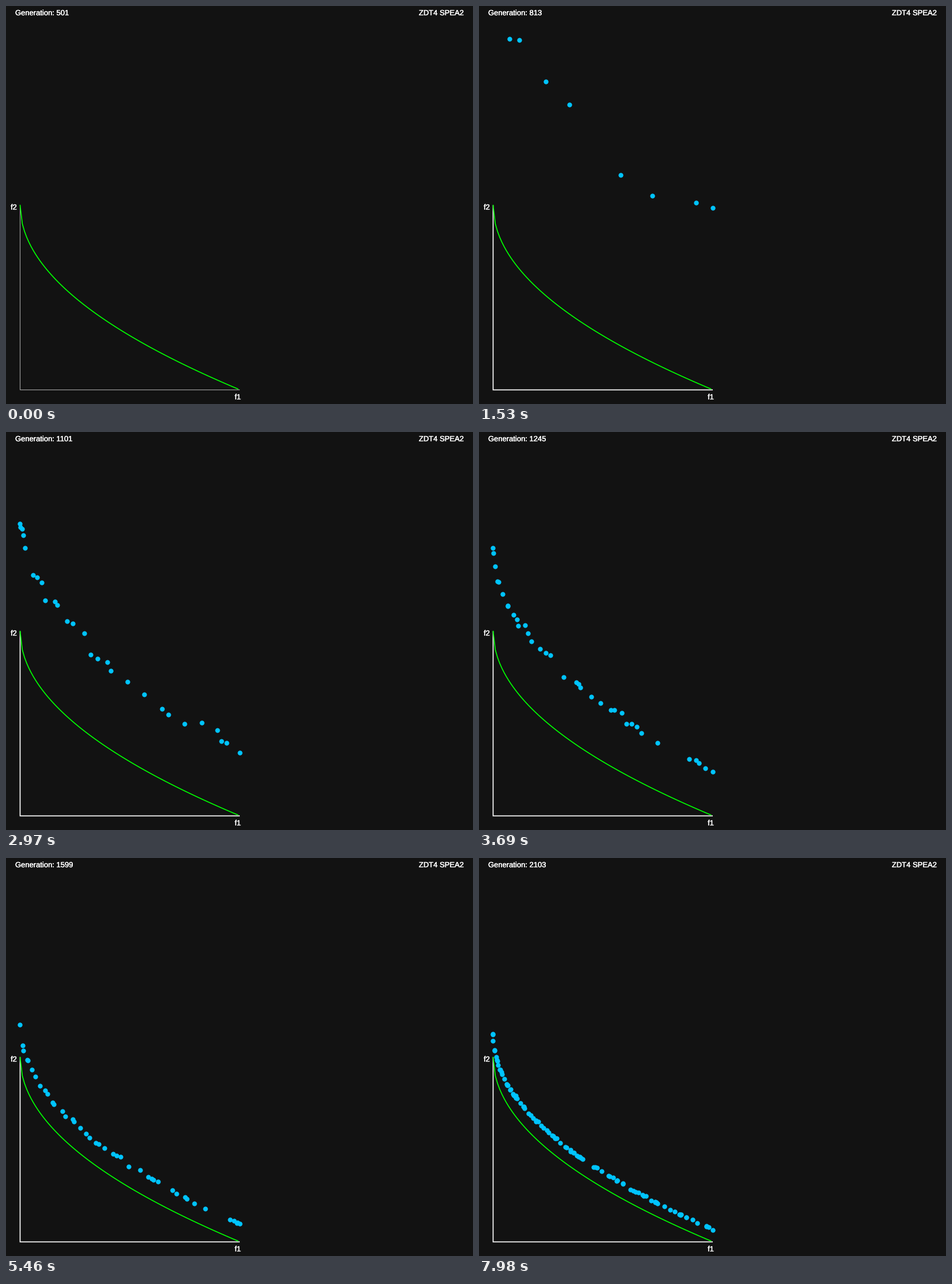
Write a matplotlib script that moves like this. It is 811 px wide and 690 px high and loops after 8000 ms.

```python
import numpy as np
import matplotlib.pyplot as plt
from matplotlib.animation import FuncAnimation
from matplotlib.patheffects import withStroke

W, H, DPI = 811, 690, 64
PT = 72 / DPI                      # points per pixel
LOOP, TICK, STEP = 8000, 20, 30    # ms
X0, Y0, SX, SY = 24, 665, 382, 320
BG, DOT, CURVE = "#121212", "#00c4ff", "#00ff00"

# How the search goes: front level, spread above it and number of candidates
STEPS = [0, 51, 99, 149, 182, 220, 266]
LEVEL = [4.25, 2.28, 1.57, 1.265, 1.165, 1.153, 1.118]
SPREAD = [0.3, 0.25, 0.1, 0.025, 0.02, 0.012, 0.015]
COUNT = [10, 14, 40, 50, 44, 110, 95]
SLOTS, HOLD = max(COUNT), 8
GOLDEN = (5 ** 0.5 - 1) / 2

plt.rcParams["text.hinting"] = "none"
rng = np.random.default_rng(11)
slots = np.arange(SLOTS)
life = rng.uniform(20, 45, SLOTS)          # steps until a slot is refilled
age = rng.uniform(0, 45, SLOTS)
phase = rng.integers(0, HOLD, SLOTS)       # when a slot improves
refills = int((STEPS[-1] + 45) / 20) + 1
shift = rng.uniform(-0.03, 0.03, (SLOTS, refills))
rise = rng.random((SLOTS, refills)) ** 2


def undominated(x, y, slack=2.0):
    order = np.lexsort((-y, x))
    x, y = x[order], y[order]
    keep = y >= np.maximum.accumulate(y) - slack
    return x[keep], y[keep]


def population(n):
    """Pixel places of the best dots after n steps."""
    live = slots[:round(np.interp(n, STEPS, COUNT))]
    fill = ((n + age[live]) // life[live]).astype(int)
    u = (live * GOLDEN + shift[live, fill]) % 1
    f1 = u ** 1.5
    f1[:2] = 0, 1                          # both ends are always kept
    held = n - (n + phase[live]) % HOLD
    g = np.interp(held, STEPS, LEVEL)
    g += np.interp(n, STEPS, SPREAD) * rise[live, fill]
    f2 = g - np.sqrt(f1 * g)
    return undominated(X0 + SX * f1, Y0 - SY * f2)


fig = plt.figure(figsize=(W / DPI, H / DPI), dpi=DPI, facecolor=BG)
ax = fig.add_axes([0, 0, 1, 1])
ax.set_xlim(0, W)
ax.set_ylim(H, 0)
ax.axis("off")


def label(x, y, text, ha="left"):
    return ax.text(x, y, text, ha=ha, va="baseline", color="white", zorder=4,
                   fontfamily="Liberation Sans", fontsize=13 * PT,
                   path_effects=[withStroke(linewidth=0.4 * PT, foreground="white")])


counter = label(16, 16, "")
label(795, 16, "ZDT4 SPEA2", "right")
label(8, 353, "f2")
label(397, 682, "f1")

left, base = X0 + 0.5, Y0 + 0.5
axes_line, = ax.plot([left, left, X0 + SX], [base - SY, base, base], zorder=2,
                     solid_capstyle="butt", solid_joinstyle="miter", snap=False)
f1 = np.arange(100) / 100
ax.plot(left + SX * f1, base - SY * (1 - np.sqrt(f1)), color=CURVE,
        lw=1.7 * PT, zorder=3)
dots, = ax.plot([], [], "o", color=DOT, ms=8.3 * PT, mew=0, zorder=5, snap=False)


def draw(k):
    n = (k * TICK + TICK // 2) // STEP
    counter.set_text(f"Generation: {501 + 6 * (n + 1) if n else 501}")
    axes_line.set_color("white" if n else "#a4a4a4")
    axes_line.set_linewidth((1.7 if n else 1.1) * PT)
    dots.set_data(*population(n))
    return counter, axes_line, dots


anim = FuncAnimation(fig, draw, frames=LOOP // TICK, interval=TICK,
                     init_func=lambda: draw(0), repeat=True, repeat_delay=0)
plt.show()
```
